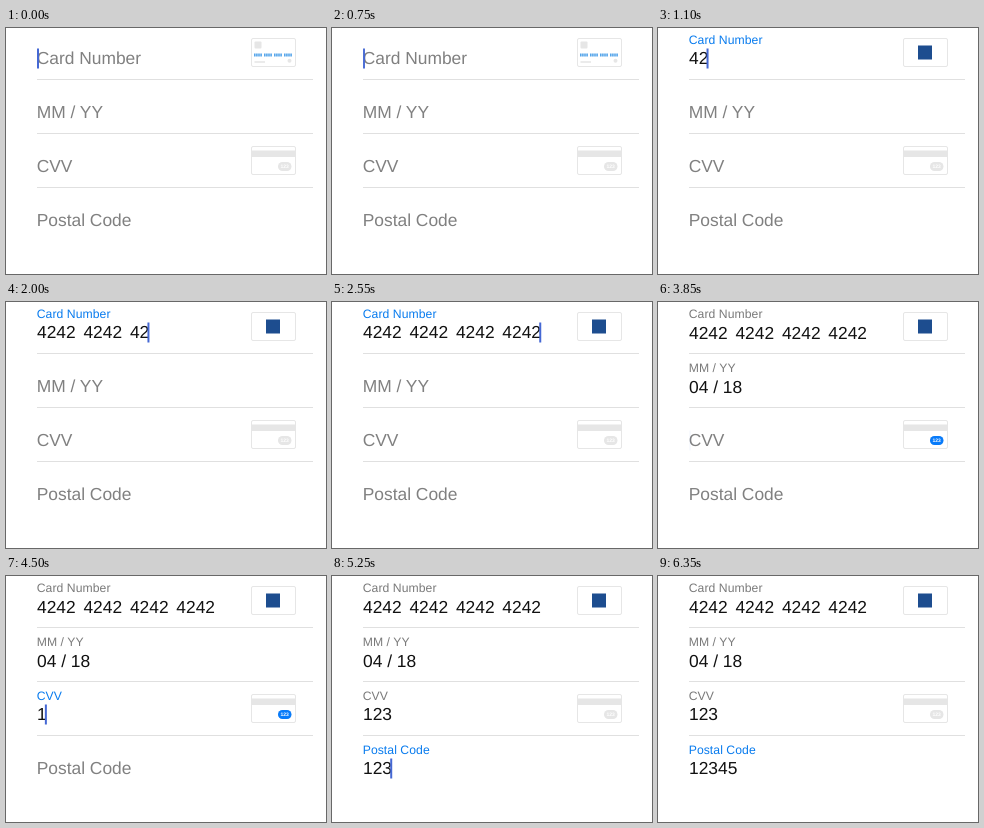
These frames come from a looping animation (320 by 246 pixels, 6.45 s). An HTML page:

```html
<!DOCTYPE html>
<html lang="en">
<head>
<meta charset="utf-8">
<title>Card form</title>
<style>
  html, body { margin: 0; width: 100%; height: 100%; overflow: hidden; background: #fff; }
  svg { display: block; width: 320px; height: 246px; }
  text { font-family: "Liberation Sans", Arial, sans-serif; white-space: pre; text-rendering: geometricPrecision; }
  .hint { font-size: 17.4px; fill: #808080; }
  .label { font-size: 12.2px; letter-spacing: 0.06px; fill: #7a7a7a; }
  .label.on { fill: #087bee; }
  .value { font-size: 17.4px; fill: #111; }
  .frame { fill: #fff; stroke: #e6e6e6; }
  .grey { fill: #e6e6e6; }
  .tiny { font-size: 5px; font-weight: bold; fill: #fff; text-anchor: middle; }
</style>
</head>
<body>
<svg viewBox="0 0 320 246">
  <g id="lines" fill="#e0e0e0"></g>
  <rect class="frame" x="245.5" y="10.5" width="44" height="28" rx="1.5"/>
  <g id="blank">
    <rect class="grey" x="248.5" y="13.5" width="7" height="7" rx="1"/>
    <path d="M248 27H287" stroke="#55a5ea" stroke-width="3.2" stroke-dasharray="1.6 .5 1.6 .5 1.6 .5 1.6 2.1"/>
    <path d="M248.5 34H259" stroke="#e4e4e4" stroke-width="1.5"/>
    <circle class="grey" cx="283.5" cy="32.7" r="2"/>
  </g>
  <rect id="brand" x="260" y="17.5" width="14" height="14" fill="#1d4d8f"/>
  <rect class="frame" x="245.5" y="118.5" width="44" height="28" rx="1.5"/>
  <rect class="grey" x="245.5" y="122.5" width="44" height="6.5"/>
  <rect class="grey" x="272" y="134" width="13.5" height="9" rx="4.5"/>
  <rect id="pill" x="272" y="134" width="13.5" height="9" rx="4.5" fill="#087bfa"/>
  <text class="tiny" x="278.7" y="140.3">123</text>
  <g id="fields"></g>
  <rect id="caret" width="2" height="20" fill="#4568d4"/>
</svg>
<script>
const LOOP = 6450, STEP = 54, LEFT = 31, FLOAT = 100, BLINK = 110;
const byId = id => document.getElementById(id);

// focus: start of focus, keys: key press times, settle: shift after losing focus
const fields = [
  { name: "Card Number", focus: 0, settle: 0.8, spacing: -0.95,
    keys: [850, 1050, 1245, 1360, 1460, 1560, 1660, 1760, 1895, 1980, 2060, 2140, 2220, 2300, 2400, 2545],
    text: n => "4242  4242  4242  4242".slice(0, n + 2 * Math.floor(Math.max(n - 1, 0) / 4)) },
  { name: "MM / YY", focus: 2595, settle: 0.8, spacing: 0, keys: [2790, 2980, 3240, 3490],
    text: n => ["", "0", "04 /", "04 / 1", "04 / 18"][n] },
  { name: "CVV", focus: 3545, settle: 0, spacing: 0, keys: [4380, 4590, 4745],
    text: n => "123".slice(0, n) },
  { name: "Postal Code", focus: 4795, settle: 0, spacing: 0, keys: [4940, 5090, 5230, 5370, 5490],
    text: n => "12345".slice(0, n) }
];
// caret hidden between each pair of times
const blinks = [[200, 500], [745, 850], [3745, 3950], [4145, 4380], [5745, 6000], [6235, 6600]];

function add(parent, tag, attrs, content = "") {
  const el = document.createElementNS("http://www.w3.org/2000/svg", tag);
  for (const key in attrs) el.setAttribute(key, attrs[key]);
  el.textContent = content;
  return parent.appendChild(el);
}

fields.forEach((f, i) => {
  const top = i * STEP, box = byId("fields");
  if (i < 3) add(byId("lines"), "rect", { x: 31, y: top + 51, width: 276, height: 1 });
  f.hint = add(box, "text", { class: "hint", x: LEFT - 0.3, y: top + 36 }, f.name);
  f.label = add(box, "text", { x: LEFT - 0.3, y: top + 16.2 }, f.name);
  f.value = add(box, "text", { class: "value", x: LEFT, "word-spacing": f.spacing });
});

const ramp = (t, start, span) => Math.min(1, Math.max(0, (t - start) / span));

function draw(t) {
  const current = fields.filter(f => t >= f.focus).length - 1;
  fields.forEach((f, i) => {
    const count = f.keys.filter(k => t >= k).length;
    const rise = ramp(t, f.keys[0], FLOAT);
    f.hint.setAttribute("opacity", count ? 0 : 1);
    f.label.setAttribute("opacity", rise);
    f.label.setAttribute("transform", `translate(0 ${8 * (1 - rise) ** 2})`);
    f.label.setAttribute("class", i === current ? "label on" : "label");
    f.value.textContent = f.text(count);
    f.value.setAttribute("y", i * STEP + 36.2 + (i < current ? f.settle : 0));
  });

  const { value } = fields[current];
  const width = value.textContent ? value.getComputedTextLength() : 0;
  const caret = byId("caret");
  caret.setAttribute("x", Math.max(31, LEFT + width - 1.8));
  caret.setAttribute("y", current * STEP + 20.5);
  caret.setAttribute("opacity", blinks.reduce(
    (a, [out, back]) => a - ramp(t, out, BLINK) + ramp(t, back, BLINK), 1));

  const known = ramp(t, 850, 150);
  byId("brand").setAttribute("opacity", known);
  byId("blank").setAttribute("opacity", 1 - known);
  byId("pill").setAttribute("opacity",
    ramp(t, fields[2].focus, FLOAT) - ramp(t, fields[3].focus, FLOAT));
}

const start = performance.now();
function tick() {
  draw((performance.now() - start) % LOOP);
  requestAnimationFrame(tick);
}
tick();
</script>
</body>
</html>
```
